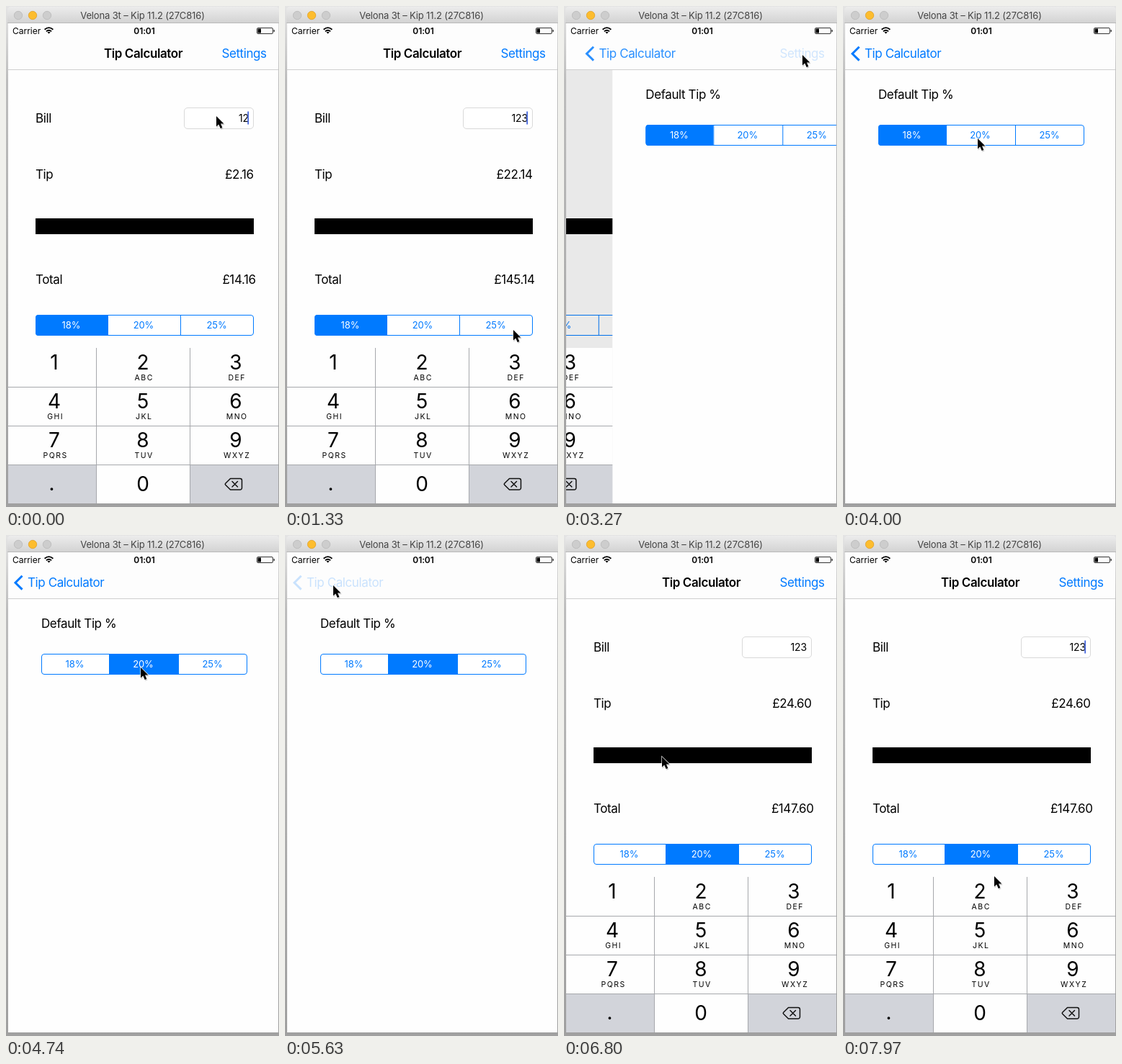
Animation, 379 px wide and 696 px high, one loop 8000 ms. Source, as an HTML page:

```html
<!DOCTYPE html>
<html lang="en">
<head>
<meta charset="utf-8">
<title>Tip Calculator</title>
<style>
  html, body { margin: 0; width: 100%; height: 100%; overflow: hidden; background: #b0b0b0; }
  svg { display: block; width: 100%; height: 100%; }
  text { font-family: Inter, sans-serif; font-size: 17px; letter-spacing: -0.4px; white-space: pre; }
</style>
</head>
<body>
<svg id="stage" viewBox="0 0 379 696" xmlns="http://www.w3.org/2000/svg"></svg>
<script>
const BLUE = '#007aff';
const LOOP = 8000;
const WIDTH = 375;

function text(x, y, str, o = {}) {
  const { size = 17, anchor = 'start', fill = '#000', weight = 400, gap = -0.4, id = '' } = o;
  return `<text ${id && `id="${id}"`} x="${x}" y="${y}" text-anchor="${anchor}" fill="${fill}"
    style="font-size:${size}px;font-weight:${weight};letter-spacing:${gap}px">${str}</text>`;
}

function rect(x, y, w, h, fill, extra = '') {
  return `<rect x="${x}" y="${y}" width="${w}" height="${h}" fill="${fill}" ${extra}/>`;
}

function line(x1, y1, x2, y2, color) {
  return `<path d="M${x1} ${y1}L${x2} ${y2}" stroke="${color}"/>`;
}

// Segmented control; edges are the x positions of its borders and dividers.
function segments(id, y, edges) {
  const left = edges[0], w = edges[3] - left;
  const parts = ['18%', '20%', '25%'].map((label, i) => {
    const a = edges[i], b = edges[i + 1];
    return rect(a, y, b - a, 29, '#fff', 'class="cell"') +
      text((a + b) / 2 - 0.5, y + 19, label,
        { size: 13, anchor: 'middle', gap: -0.1, fill: BLUE });
  }).join('');
  return `<clipPath id="${id}Clip">${rect(left, y, w, 29, '#000', 'rx="4"')}</clipPath>
    <g id="${id}"><g clip-path="url(#${id}Clip)">${parts}</g>
    ${line(edges[1] + 0.5, y, edges[1] + 0.5, y + 29, BLUE)}
    ${line(edges[2] + 0.5, y, edges[2] + 0.5, y + 29, BLUE)}
    ${rect(left + 0.5, y + 0.5, w - 1, 28, 'none', `stroke="${BLUE}" rx="3.5"`)}</g>`;
}

function keypad() {
  const centers = [67, 190, 319];
  const letters = ['', 'ABC', 'DEF', 'GHI', 'JKL', 'MNO', 'PQRS', 'TUV', 'WXYZ'];
  const grid = '#a6a8ac';
  let out = rect(3, 475, 375, 216, '#fefefe') +
    rect(3, 638, 122, 53, '#d2d4da') + rect(256, 638, 122, 53, '#d2d4da');
  letters.forEach((word, i) => {
    const x = centers[i % 3], y = 505 + 54 * Math.floor(i / 3);
    out += text(x, y, i + 1, { size: 28, anchor: 'middle', gap: 0 }) +
      text(x + 1.7, y + 15.3, word, { size: 10.5, anchor: 'middle', gap: 1.5 });
  });
  out += text(190, 674, '0', { size: 28, anchor: 'middle', gap: 0 }) +
    text(63.5, 672.5, '.', { size: 26, anchor: 'middle', gap: 0, weight: 500 });
  for (const y of [529.5, 583.5, 637.5]) out += line(3, y, 378, y, grid);
  for (const x of [125.5, 255.5]) out += line(x, 475, x, 691, grid);
  return out + `<path d="M311.5 656.5H325a2.5 2.5 0 0 1 2.5 2.5v10.500a2.500 2.500 0 0 1-2.500 2.500H311.500L304.700 665.300q-1-1 0-2Z
    M314 660.500l7.500 7.500M321.500 660.500l-7.500 7.500" fill="none" stroke="#111" stroke-width="1.500"
    stroke-linecap="round" stroke-linejoin="round"/>`;
}

function light(x, fill, stroke) {
  return `<circle cx="${x}" cy="13" r="5.7" fill="${fill}" stroke="${stroke}" stroke-width=".8"/>`;
}

const stage = document.getElementById('stage');
stage.innerHTML = `
<defs>
  <linearGradient id="bar" x2="0" y2="1"><stop stop-color="#ececec"/><stop offset="1" stop-color="#d2d2d2"/></linearGradient>
  <linearGradient id="desk" x2="0" y2="1"><stop stop-color="#e4e4e4"/><stop offset=".15" stop-color="#bdbdbd"/><stop offset="1" stop-color="#a0a0a0"/></linearGradient>
  <clipPath id="screen">${rect(3, 24, 375, 667, '#000')}</clipPath>
</defs>
${rect(0, 0, 379, 696, 'url(#desk)')}
<path d="M2 24V6q0-5 5-5H374q5 0 5 5V24Z" fill="url(#bar)"/>
${line(2, 23.5, 379, 23.5, '#b9b9b9')}
${light(17, '#cdcdcd', '#b9b9b9')}${light(37, '#fdbd2e', '#e0a028')}${light(57, '#cdcdcd', '#b9b9b9')}
${text(189.5, 18, 'Velona 3t – Kip 11.2 (27C816)', { size: 13, anchor: 'middle', fill: '#444', gap: -0.15 })}
<g clip-path="url(#screen)">
  ${rect(3, 24, 375, 667, '#fefefe')}
  <g id="home">
    ${text(41, 161.5, 'Bill')}${text(41, 239.5, 'Tip')}${text(41, 385.5, 'Total')}
    ${rect(247.5, 141.5, 96, 29, '#fff', 'stroke="#d9d9d9" rx="4.5"')}
    ${text(337, 160.5, '', { id: 'bill', size: 14, anchor: 'end', gap: -0.1 })}
    ${rect(335.3, 146.500, 1.800, 18, '#4466dd', 'id="caret"')}
    ${text(343.6, 239.5, '', { id: 'tip', anchor: 'end' })}
    ${text(346.6, 385.5, '', { id: 'total', anchor: 'end' })}
    ${rect(41, 295, 303, 22, '#000')}
    ${segments('rate', 429, [41, 141, 242, 344])}
  </g>
  ${rect(3, 24, 375, 667, '#000', 'id="dim"')}
  <g id="prefs">
    ${rect(3, 24, 375, 667, '#fefefe')}
    ${text(49, 128.5, 'Default Tip %')}
    ${segments('preset', 165, [49, 143, 239, 335])}
  </g>
  <g id="keypad">${keypad()}</g>
  ${rect(3, 24, 375, 64, '#fdfdfd')}
  ${line(3, 88.5, 378, 88.5, '#cfcfcf')}
  ${text(190.5, 72, 'Tip Calculator', { id: 'title', anchor: 'middle', weight: 600 })}
  ${text(361.7, 72, 'Settings', { id: 'settings', anchor: 'end', fill: BLUE })}
  <g id="back">
    <path d="M22.500 56.800L13 66.200L22.500 75.600" fill="none" stroke="${BLUE}" stroke-width="3"/>
    ${text(30, 72, 'Tip Calculator', { fill: BLUE })}
  </g>
  ${text(9, 38.5, 'Carrier', { size: 12, gap: 0 })}
  ${text(192, 38.5, '01:01', { size: 12, anchor: 'middle', weight: 600, gap: -0.1 })}
  <g fill="none" stroke="#000" stroke-width="1.800">
    <path d="M53.600 32.700q5.900-5.200 11.800 0M55.900 35.200q3.600-3 7.200 0"/>
    <path d="M59.500 38.600l-2.100-2q2.100-1.500 4.200 0Z" fill="#000" stroke="none"/>
  </g>
  ${rect(348.5, 30.5, 22, 8, 'none', 'stroke="#333" rx="1.500"')}
  ${rect(349.500, 31.500, 4.500, 6, '#000')}${rect(371.500, 33, 1.500, 3, '#333', 'rx=".7"')}
</g>
<g id="cursor">
  <path d="M.5 1.500V16.500L4 13.300L6.400 18.700L9.500 17.400L7.200 12.200H11.800Z" fill="#000" opacity=".2"/>
  <path d="M0 0V14.500L3.300 11.400L5.700 17L8.400 15.900L6 10.400H10.500Z" fill="#000" stroke="#fff" stroke-width="1.300" paint-order="stroke"/>
</g>`;

const el = id => document.getElementById(id);
const shift = (id, x, y = 0) => el(id).setAttribute('transform', `translate(${x} ${y})`);
const fade = (id, v) => el(id).setAttribute('opacity', v);
const between = (k, a, b) => k >= a && k < b;

// Pointer stops: step, x, y.
const path = [
  [0, 292, 153], [1, 275, 190], [3, 220, 320], [5, 192, 425], [7, 280, 440],
  [9, 317, 450], [11, 317, 450], [13, 340, 300], [14, 346, 220], [15, 343, 150],
  [17, 335, 105], [19, 331, 68], [22, 331, 68], [23, 340, 70], [24, 325, 82],
  [26, 215, 164], [27, 187, 184], [32, 187, 184], [34, 95, 95], [35, 67, 70],
  [43, 67, 70], [44, 76, 96], [45, 100, 200], [46, 136, 308], [48, 135, 311],
  [49, 135, 311], [51, 152, 380], [53, 204, 466], [54, 210, 474]
];

function pointer(k) {
  const i = path.findIndex(p => p[0] >= k);
  if (i < 0) return path[path.length - 1].slice(1);
  if (i === 0) return path[0].slice(1);
  const [k0, x0, y0] = path[i - 1], [k1, x1, y1] = path[i];
  const u = (k - k0) / (k1 - k0);
  return [x0 + (x1 - x0) * u, y0 + (y1 - y0) * u];
}

function stepAt(t) {
  return t < 6655 ? Math.floor((t + 8) / 148.1) : 45 + Math.floor((t - 6655) / 145);
}

function ease(u) {
  const c = Math.min(1, Math.max(0, u));
  return 1 - (1 - c) ** 3;
}

function select(id, index) {
  const group = el(id);
  group.querySelectorAll('.cell').forEach((c, i) => c.setAttribute('fill', i === index ? BLUE : '#fff'));
  group.querySelectorAll('text').forEach((c, i) => c.setAttribute('fill', i === index ? '#fff' : BLUE));
}

function draw(t) {
  const k = stepAt(t);
  const bill = k < 5 ? 12 : 123;
  const rate = k < 11 ? 0 : k < 31 ? 2 : 1;
  const tip = bill * [18, 20, 25][rate] / 100;
  el('bill').textContent = bill;
  el('tip').textContent = '£' + tip.toFixed(2);
  el('total').textContent = '£' + (bill + tip).toFixed(2);
  select('rate', rate);
  select('preset', k < 31 ? 0 : 1);

  const caretOn = k < 2 || between(k, 5, 11) || between(k, 14, 20) || between(k, 47, 51) || k >= 53;
  fade('caret', caretOn ? 1 : 0);

  const p = k < 30 ? ease((k - 20.4) / 3.6) : 1 - ease((k - 38.4) / 3.6);
  shift('home', -0.3 * WIDTH * p);
  shift('prefs', WIDTH * (1 - p));
  shift('keypad', -WIDTH * p);
  fade('dim', 0.1 * p);
  shift('title', -108 * p);
  fade('title', Math.max(0, 1 - 1.4 * p));
  fade('settings', k === 20 ? 0.2 : 1 - p);
  shift('back', 108 * (1 - p));
  fade('back', between(k, 37, 39) ? 0.2 : p);

  shift('cursor', ...pointer(k));
}

function tick(now) {
  draw(now % LOOP);
  requestAnimationFrame(tick);
}
draw(0);
requestAnimationFrame(tick);
</script>
</body>
</html>
```
